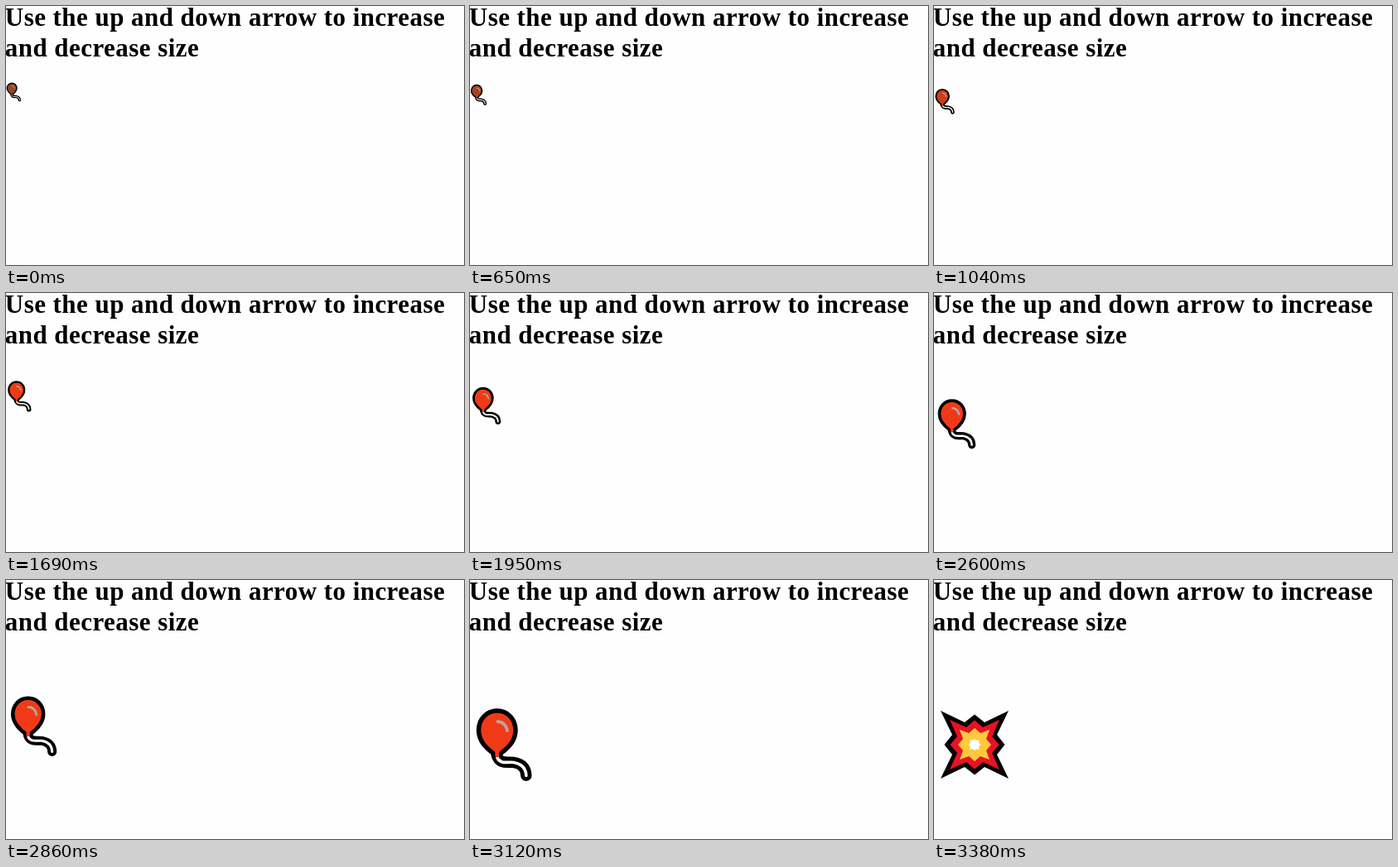
Write an HTML page that moves like this. It is 553x313 px and loops after 4.29 s.

```html
<!DOCTYPE html>
<html lang="en">
<head>
<meta charset="utf-8">
<title>Balloon</title>
<style>
html, body { margin: 0; width: 100%; height: 100%; overflow: hidden; background: #fefefe; }
svg { display: block; width: 553px; height: 313px; }
text { font: bold 31px "Liberation Serif", "Times New Roman", serif; letter-spacing: .45px; }
path { stroke-linecap: round; stroke-linejoin: round; }
</style>
</head>
<body>
<svg viewBox="0 0 553 313">
  <text x="-1.2" y="24">Use the up and down arrow to increase</text>
  <text x="-1.2" y="60.5">and decrease size</text>
  <g id="balloon" fill="none">
    <path d="M28 116C31 126 39 122.500 45 123.500C53 125 57 129 57.300 136.500" stroke="#000" stroke-width="11"/>
    <path id="skin" d="M28.500 72.300C39 72.300 46.800 80.500 46.800 91.500C46.800 102.500 39 109.500 31.500 115L25.500 115C18 109.500 10.200 102.500 10.200 91.500C10.200 80.500 18 72.300 28.500 72.300Z" stroke="#000" stroke-width="4.500"/>
    <path d="M28.500 118.500C32 126 39 122.500 45 123.500C53 125 57 129 57.300 136.500" stroke="#fff" stroke-width="3"/>
    <path id="knot" d="M28.500 112V116.500" stroke-width="4"/>
    <path d="M29 83C34 83 38 87 38.500 92" stroke="#b5a79d" stroke-width="3"/>
  </g>
  <g id="boom" transform="translate(49 199)"></g>
</svg>
<script>
const LOOP = 4290, POP = 3380;
const presses = [650, 910, 1040, 1430, 1690, 1820, 1950, 2080, 2340, 2600, 2730, 2860, 2990, 3120];
const [balloon, skin, knot, boom] = ["balloon", "skin", "knot", "boom"].map(id => document.getElementById(id));

// Eight-pointed star: corners at (c, c), side tips at t, notches at (p, q)
function star(c, t, p, q, fill) {
  const pts = [];
  let quarter = [[c, c], [p, q], [0, t], [-p, q]];
  for (let i = 0; i < 4; i++) {
    pts.push(...quarter);
    quarter = quarter.map(([x, y]) => [-y, x]);
  }
  return `<polygon points="${pts.join(" ")}" fill="${fill}"/>`;
}
boom.innerHTML = star(41, 36.5, 12, 27, "#000") + star(30, 29.5, 10, 21, "#e81224") +
  star(18, 20, 7, 14, "#ffc83d") + star(6, 7, 3, 5, "#fff");

function draw(now) {
  const t = now % LOOP;
  const n = presses.filter(p => p <= t).length;
  const k = Math.min(n / 5, 1);
  const mix = (a, b) => Math.round(a + (b - a) * k);
  const red = `rgb(${mix(150, 240)},${mix(68, 58)},${mix(38, 23)})`;
  skin.setAttribute("fill", red);
  knot.setAttribute("stroke", red);
  // Each key press grows the balloon by a tenth
  balloon.setAttribute("transform", `translate(-2 70) scale(${1.007 * 1.1 ** (n - 12)})`);
  balloon.style.display = t < POP ? "" : "none";
  boom.style.display = t < POP ? "none" : "";
}

const start = performance.now();
function frame() {
  draw(performance.now() - start);
  requestAnimationFrame(frame);
}
frame();
</script>
</body>
</html>
```
